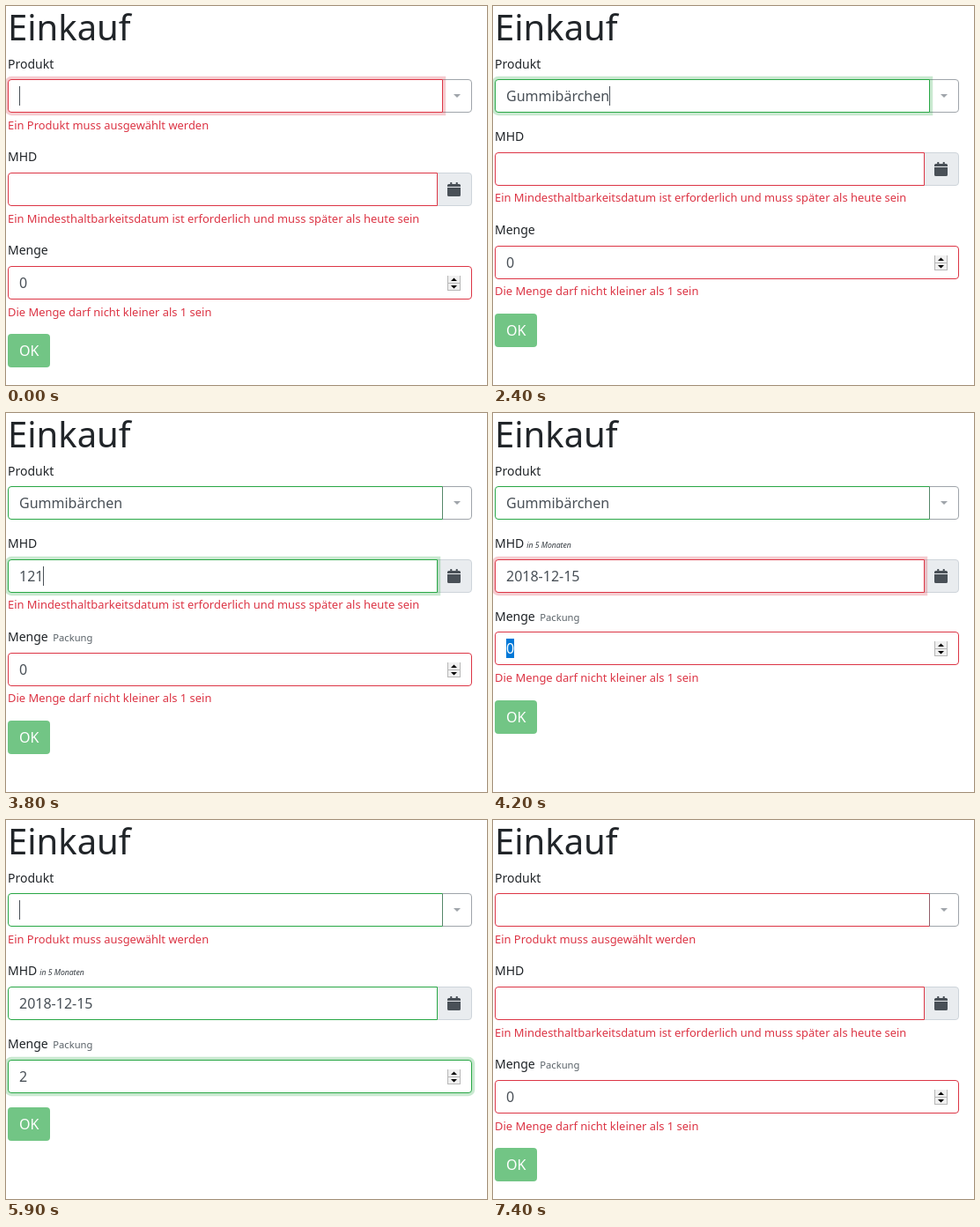
Animation, 546 px wide and 430 px high, one loop 7.5 s. Source, as an HTML page:

```html
<!DOCTYPE html>
<html lang="de">
<head>
<meta charset="utf-8">
<style>
  html, body { margin: 0; width: 100%; height: 100%; overflow: hidden; background: #fff; }
  body { position: relative; font: 16px/24px "Noto Sans", sans-serif; color: #212529; }
  body * { box-sizing: border-box; }
  h1 { position: absolute; left: 2px; top: 0; margin: 0; font-size: 40px; font-weight: 400; line-height: 48px; }
  .label, .error, .input, .addon, .arrow, .spin, .menu, .ok { position: absolute; white-space: pre; }
  .label { left: 2px; font-size: 14px; line-height: 21px; }
  .unit { margin-left: 5.5px; font-size: 11.2px; color: #5a6268; }
  .hint { margin-left: 3px; font-size: 8.6px; font-style: italic; color: #343a40; }
  .error { left: 2px; font-size: 12.93px; line-height: 19.2px; color: #dc3545; }
  .input { left: 2px; height: 38px; padding: 0 12px; display: flex; align-items: center;
           border: 1px solid; border-radius: 4px 0 0 4px; background: #fff; color: #495057; z-index: 1; }
  .input.full { border-radius: 4px; }
  .caret { width: 1px; height: 22px; background: #495057; }
  .selected { line-height: 22px; background: #0078d7; color: #fff; }
  .addon { left: 489px; width: 40px; height: 38px; border: 1px solid #ced4da; border-radius: 0 4px 4px 0; background: #e9ecef; }
  .addon svg { position: absolute; left: 11px; top: 10px; fill: #495057; }
  .arrow { left: 495px; width: 34px; height: 38px; border: 1px solid #6c757d; border-radius: 0 4px 4px 0; opacity: .65; z-index: 2; }
  .arrow::after { content: ""; position: absolute; left: 12px; top: 16px; border: 4px solid transparent; border-top-color: #6c757d; border-bottom: 0; }
  .spin { left: 501px; z-index: 4; }
  .menu { left: 2px; top: 123px; min-width: 160px; padding: 8px 0; border: 1px solid rgba(0,0,0,.15);
          border-radius: 4px; background: #fff; z-index: 5; }
  .menu div { padding: 4px 24px; }
  .ok { left: 2px; height: 38px; padding: 7px 13px; border-radius: 4px; background: #28a745; color: #fff; }
</style>
</head>
<body>
<script>
const LOOP = 7500, TICK = 100, FADE = 200;
const TOP = 83.2, ROW = 82.6, ERROR_ROW = 23.3;
const GREEN = [40, 167, 69], RED = [220, 53, 69];
const PRODUCTS = ['Gulaschsuppe', 'Gummibärchen', 'Gurke', 'Essiggurken', 'Joghurt'];

// p = product, d = date, a = amount; "good" and "errors" list those letters
const empty = { p: '', d: '', a: '0', good: '', errors: 'pda', focus: 'p', caret: 1, query: '', unit: 0, hint: 0, selected: 0, ready: 0 };
const changes = [
  [0, empty],
  [300, { caret: 0 }],
  [900, { caret: 1 }],
  [1200, { p: 'g', good: 'p' }],
  [1300, { p: 'gu', query: 'g' }],
  [1400, { query: 'gu' }],
  [1600, { p: 'gum' }],
  [1700, { p: 'gumm', query: 'gum' }],
  [1800, { query: 'gumm' }],
  [2000, { caret: 0 }],
  [2400, { p: 'Gummibärchen', query: '', caret: 1, errors: 'da' }],
  [2500, { focus: 'd', unit: 1 }],
  [3000, { caret: 0 }],
  [3500, { caret: 1 }],
  [3700, { d: '1', good: 'pd', errors: 'a' }],
  [3800, { d: '121', good: 'p', errors: 'da' }],
  [3900, { d: '1215' }],
  [4100, { d: '2018-12-15' }],
  [4200, { good: 'pd', errors: 'a', focus: 'a', selected: 1, caret: 0, hint: 1 }],
  [5200, { a: '2', good: 'pda', errors: '', selected: 0, caret: 1, ready: 1 }],
  [5800, { caret: 0 }],
  [5900, { p: '', good: 'da', errors: 'p', focus: 'p', caret: 1, ready: 0 }],
  [6000, { ...empty, unit: 1, snap: 1 }],
  [6400, { caret: 0 }],
  [6900, { caret: 1 }],
  [7400, { focus: '', snap: 1 }],
];
const states = [];
changes.forEach(([at, patch], i) => states.push({ ...states[i - 1], snap: 0, ...patch, at }));

const fields = [
  { key: 'p', label: 'Produkt', width: 494, error: 'Ein Produkt muss ausgewählt werden' },
  { key: 'd', label: 'MHD', width: 488, error: 'Ein Mindesthaltbarkeitsdatum ist erforderlich und muss später als heute sein' },
  { key: 'a', label: 'Menge', width: 527, error: 'Die Menge darf nicht kleiner als 1 sein' },
];

const box = (name, top, content = '', style = '') =>
  `<div class="${name}" style="top:${Math.round(top)}px;${style}">${content}</div>`;

const calendar = `<svg width="15" height="16" viewBox="0 0 448 512" preserveAspectRatio="none">
  <path d="M0 160v-48q0-48 48-48h48V12q0-12 12-12h40q12 0 12 12v52h128V12q0-12 12-12h40q12 0 12 12v52h48q48 0 48 48v48zM0 192h448v272q0 48-48 48H48q-48 0-48-48z"/></svg>`;
const spinner = `<svg width="15" height="17" style="display:block">
  <path d="M0 0h15v17H0z" fill="#f0f0f0"/>
  <path d="M.5 0v17M14.5 0v17M0 8.5h15M0 16.5h15" stroke="#b8b8b8"/>
  <path d="M4 6h7L7.5 2.5zM4 11h7l-3.5 3.5z"/></svg>`;

function look(state, key) {
  return [...(state.good.includes(key) ? GREEN : RED), state.focus === key ? .25 : 0];
}

function inputStyle(state, previous, key, progress) {
  const from = look(previous, key);
  const [r, g, b, glow] = look(state, key).map((v, i) => from[i] + (v - from[i]) * progress);
  const depth = glow > 0 ? 'z-index:3;' : '';
  return `border-color:rgb(${r},${g},${b});box-shadow:0 0 0 3.2px rgba(${r},${g},${b},${glow});${depth}`;
}

function menu(query) {
  const match = new RegExp(query, 'i');
  const marks = new RegExp(`(${query})`, 'gi');
  const items = PRODUCTS.filter(name => match.test(name));
  return `<div class="menu">${items.map(name => `<div>${name.replace(marks, '<b>$1</b>')}</div>`).join('')}</div>`;
}

function render(time) {
  const index = states.findLastIndex(s => s.at <= time);
  const state = states[index], previous = states[Math.max(0, index - 1)];
  const progress = state.snap ? 1 : Math.min(1, (time - state.at) / FADE);
  let html = '<h1>Einkauf</h1>', y = TOP;

  for (const { key, label, width, error } of fields) {
    let caption = label;
    if (key === 'd' && state.hint) caption += '<span class="hint">in 5 Monaten</span>';
    if (key === 'a' && state.unit) caption += '<span class="unit">Packung</span>';
    html += box('label', y - 28.65, caption);

    const selected = key === 'a' && state.selected ? ' class="selected"' : '';
    const caret = state.focus === key && state.caret ? '<i class="caret"></i>' : '';
    html += box(key === 'a' ? 'input full' : 'input', y, `<span${selected}>${state[key]}</span>${caret}`,
      `width:${width}px;` + inputStyle(state, previous, key, progress));

    if (key === 'p') html += box('arrow', y);
    if (key === 'd') html += box('addon', y, calendar);
    if (key === 'a') html += box('spin', y + 11, spinner);

    const wrong = state.errors.includes(key);
    if (wrong) html += box('error', y + 42.6, error);
    y += ROW + (wrong ? ERROR_ROW : 0);
  }
  html += box('ok', y - 28.6, 'OK', `opacity:${state.ready ? 1 : .65}`);
  if (state.query) html += menu(state.query);
  return html;
}

const stage = document.createElement('div');
document.body.append(stage);
let shown = '';

function frame() {
  const time = Math.floor(performance.now() % LOOP / TICK) * TICK;
  const html = render(time);
  if (html !== shown) stage.innerHTML = shown = html;
  requestAnimationFrame(frame);
}
frame();
</script>
</body>
</html>
```
